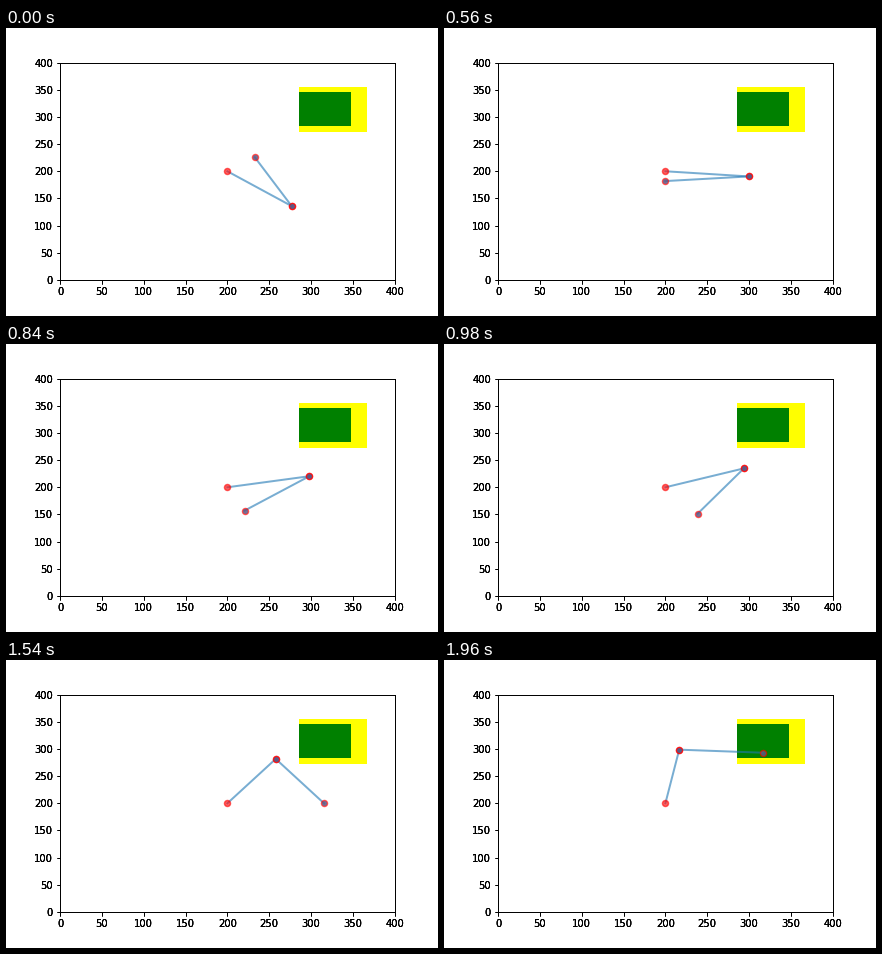
Animation of 432 by 288 pixels, one loop 2.1 s. Source, as a matplotlib script:

```python
import numpy as np
import matplotlib.pyplot as plt
from matplotlib.animation import FuncAnimation
from matplotlib.patches import Rectangle

FRAMES = 15
INTERVAL = 140
LENGTH = 100
BASE = np.array([200.0, 200.0])
ALPHA = 0.6

fig = plt.figure(figsize=(6, 4), dpi=72)
fig.subplots_adjust(left=0.125, right=0.9, bottom=0.125, top=0.88)


def add_axes():
    ax = fig.add_subplot()
    ax.set(xlim=(0, 400), ylim=(0, 400), facecolor="none")
    ax.set_xticks(range(0, 401, 50))
    ax.set_yticks(range(0, 401, 50))
    return ax


# Stacked copies make the labels and frame heavier.
ax = [add_axes() for _ in range(3)][-1]

ax.add_patch(Rectangle((285.5, 272.5), 81.5, 82.5, color="yellow", lw=0))
ax.add_patch(Rectangle((285.5, 283.5), 62, 62, color="green", lw=0))


def add_link(z):
    link, = ax.plot([], [], "o-", color="C0", lw=2, ms=6, mew=1.5,
                    mfc="red", mec="red", alpha=ALPHA, zorder=z)
    dots, = ax.plot([], [], "o", color="C0", ms=5, mew=0,
                    alpha=ALPHA, zorder=z + 0.5)
    return link, dots


upper, elbow_dot = add_link(3)
lower, end_dots = add_link(4)


def reach(start, angle):
    return start + LENGTH * np.array([np.cos(angle), np.sin(angle)])


def update(i):
    elbow = reach(BASE, -0.695 + 0.15 * i)
    tip = reach(elbow, 2.027 + 0.3 * i)
    upper.set_data(*zip(BASE, elbow))
    elbow_dot.set_data([elbow[0]], [elbow[1]])
    lower.set_data(*zip(elbow, tip))
    end_dots.set_data(*zip(elbow, tip))
    return upper, elbow_dot, lower, end_dots


anim = FuncAnimation(fig, update, frames=FRAMES, interval=INTERVAL,
                     repeat=True, repeat_delay=0)
plt.show()
```
